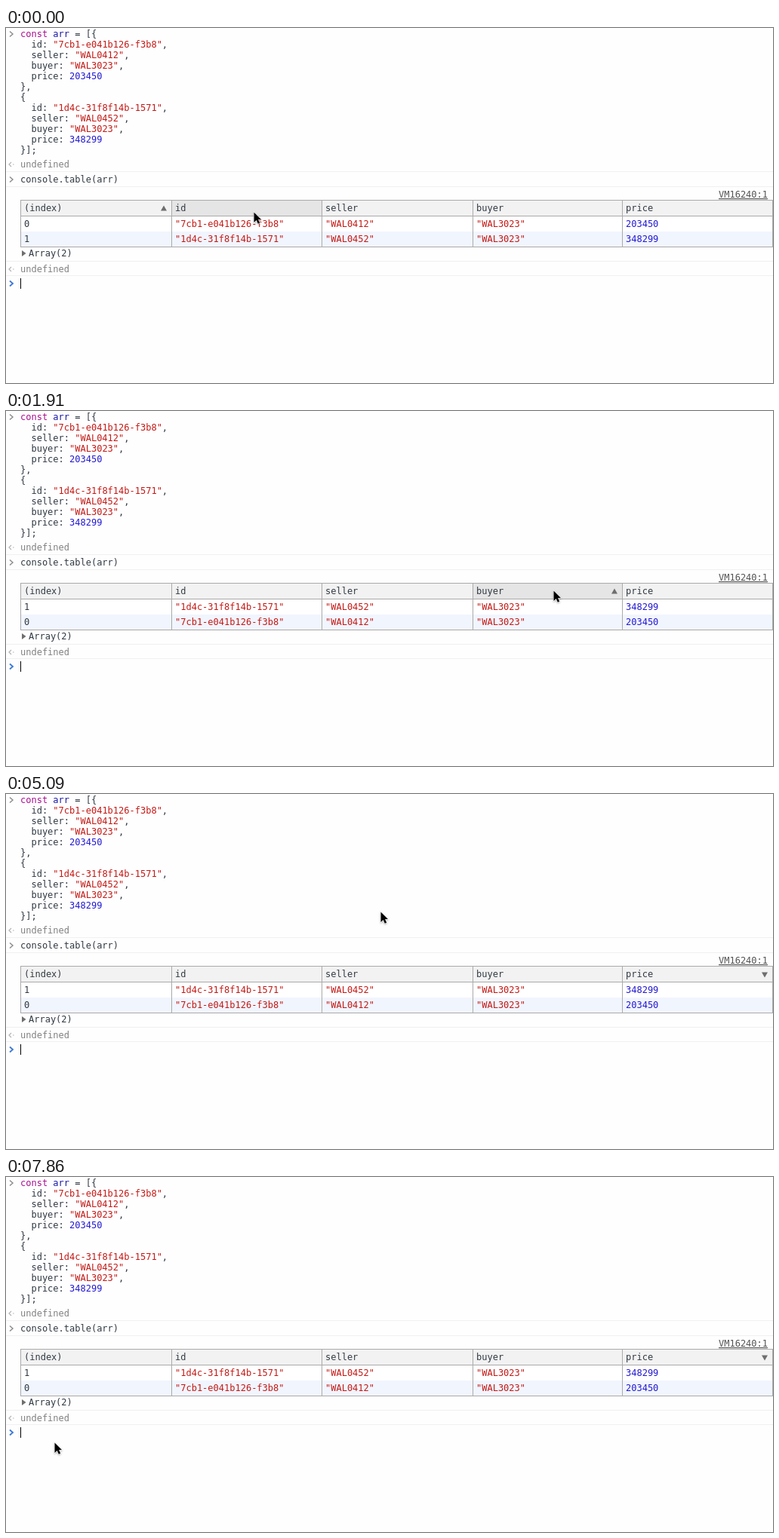
Animation of 1016x471 px, one loop 8 s. Source, as an HTML page:

```html
<!DOCTYPE html>
<html lang="en">
<head>
<meta charset="utf-8">
<title>console.table</title>
<style>
  html, body { margin: 0; width: 100%; height: 100%; overflow: hidden; background: #fefefe; }
  svg { display: block; }
  text { font: 12px "DejaVu Sans Mono", "Liberation Mono", monospace; fill: #303942; white-space: pre; }
  .keyword { fill: #aa0d91; }
  .def { fill: #1a1aa8; }
  .string { fill: #c41a16; }
  .number { fill: #241bd2; }
  .muted { fill: #808080; }
  .link { fill: #545454; text-decoration: underline; }
  .rule { fill: #f0f0f0; }
  .border { fill: #aaa; }
  .mark { fill: #6e6e6e; }
  .chevron { fill: none; stroke: #8a8a8a; stroke-width: 1.4; }
  .chevron.active { stroke: #3b78d8; stroke-width: 1.8; }
  .chevron.result { stroke: #b4b4b4; stroke-width: 1.2; }
  #pointer { filter: drop-shadow(0 1px 1px rgba(0, 0, 0, .3)); }
</style>
</head>
<body>
<svg width="1016" height="471" viewBox="0 0 1016 471">
  <g id="log"></g>
  <g id="table"></g>
  <path id="sort" class="mark"/>
  <rect id="caret" x="19" y="332" width="1" height="14" fill="#000"/>
  <path id="pointer" d="M.5 .5V14L3.7 11L5.8 15.8L8.2 14.8L6.1 10H10z"
        fill="#000" stroke="#fff" stroke-width="1.2" paint-order="stroke"/>
</svg>
<script>
const LOOP = 8000, BLINK = 498, HOLD = 125;
const HEAD = { top: 229, bottom: 249 };
const ROW = 20;
const edges = [19, 219, 418, 618, 816, 1015];
const titles = ["(index)", "id", "seller", "buyer", "price"];
const records = [
  ["7cb1-e041b126-f3b8", "WAL0412", "WAL3023", 203450],
  ["1d4c-31f8f14b-1571", "WAL0452", "WAL3023", 348299]
];
const cells = records.map((record, n) => [n, ...record]);

// Mouse releases; the pointer decides which column they sort
const clicks = [165, 320, 1200, 1440, 1910, 2890, 3870];

const home = { x: 328, y: 244 };
const moves = [
  { from: 340, to: 760, x: 549, y: 238 },
  { from: 1460, to: 1790, x: 725, y: 238 },
  { from: 2110, to: 2470, x: 899, y: 238 },
  { from: 4903, to: 5690, x: 104, y: 88, bend: 9 },
  { from: 5700, to: 6060, x: 106, y: 119 },
  { from: 6080, to: 6640, x: 73, y: 10 },
  { from: 7020, to: 7110, x: 73, y: 2 },
  { from: 7370, to: 7800, x: 64, y: 352, bend: -12 }
];

const el = id => document.getElementById(id);
const text = (x, y, body, cls = "") => `<text x="${x}" y="${y}" class="${cls}">${body}</text>`;
const rect = (x, y, w, h, attrs) => `<rect x="${x}" y="${y}" width="${w}" height="${h}" ${attrs}/>`;
const chevron = (y, cls = "") => `<path class="chevron ${cls}" d="M5 ${y - 3.5}l4 3.5l-4 3.5"/>`;
const result = y => `<path class="chevron result" d="M7 ${y - 3}l-3 3l3 3M9 ${y}h1.6"/>` +
  text(19, y + 4, "undefined", "muted");

function highlight(line) {
  return line.replace(/"[^"]*"|\b\d+\b|\bconst\b|\barr\b(?= =)/g, word => {
    const cls = word[0] === '"' ? "string" : word === "const" ? "keyword" : word === "arr" ? "def" : "number";
    return `<tspan class="${cls}">${word}</tspan>`;
  });
}

function buildLog() {
  const fields = ([id, seller, buyer, price]) =>
    [`  id: "${id}",`, `  seller: "${seller}",`, `  buyer: "${buyer}",`, `  price: ${price}`];
  const code = ["const arr = [{", ...fields(records[0]), "},", "{", ...fields(records[1]), "}];"];
  el("log").innerHTML =
    code.map((line, i) => text(19, 12 + 14 * i, highlight(line))).join("") +
    [190, 210, 309, 328].map(y => rect(0, y, 1016, 1, 'class="rule"')).join("") +
    chevron(8) + result(181) + chevron(201) + text(19, 205, "console.table(arr)") +
    text(944, 225, "VM16240:1", "link") +
    '<path class="mark" d="M21 295l5.5 4l-5.5 4z"/>' + text(30, 303, "Array(2)") +
    result(320) + chevron(339, "active");
}

function buildTable() {
  const cell = (value, i) => {
    const isString = typeof value === "string";
    const cls = isString ? "string" : i ? "number" : "";
    return text(edges[i] + 5, 264, isString ? `"${value}"` : value, cls);
  };
  const heads = titles.map((title, i) =>
    rect(edges[i], HEAD.top, edges[i + 1] - edges[i], HEAD.bottom - HEAD.top, 'class="head"') +
    text(edges[i] + 5, 243, title));
  const rows = cells.map(row => `<g class="row">${row.map(cell).join("")}</g>`);
  el("table").innerHTML =
    rect(20, 250, 995, ROW, 'fill="#fff"') + rect(20, 270, 995, ROW, 'fill="#f1f5fe"') +
    heads.join("") + rows.join("") +
    [228, 249, 290].map(y => rect(19, y, 997, 1, 'class="border"')).join("") +
    edges.map(x => rect(x, 228, 1, 63, 'class="border"')).join("");
}

// Each move starts fast and settles; bend bows it sideways.
function pointerAt(t) {
  let { x, y } = home;
  for (const { from, to, x: toX, y: toY, bend = 0 } of moves) {
    if (t < from) break;
    const u = Math.min(1, (t - from) / (to - from));
    const eased = 1 - (1 - u) ** 2.6;
    const dx = toX - x, dy = toY - y;
    const bow = bend * Math.sin(Math.PI * u) / Math.hypot(dx, dy);
    x += dx * eased - dy * bow;
    y += dy * eased + dx * bow;
  }
  return { x: Math.round(x), y: Math.round(y) };
}

const columnAt = ({ x, y }) => y >= HEAD.top && y < HEAD.bottom
  ? titles.findIndex((_, i) => x >= edges[i] && x < edges[i + 1]) : -1;

// Replays the clicks up to t, sorting the way the console does.
function sortAt(t) {
  let column = 0, sign = 1, order = [...cells];
  for (const click of clicks.filter(c => c <= t)) {
    const hit = columnAt(pointerAt(click));
    sign = hit === column ? -sign : 1;
    column = hit;
    order.sort((a, b) => sign * ((a[hit] > b[hit]) - (a[hit] < b[hit])));
  }
  return { column, sign, order };
}

buildLog();
buildTable();
const heads = [...document.querySelectorAll(".head")];
const rows = [...document.querySelectorAll(".row")];

function draw(t) {
  const pointer = pointerAt(t);
  el("pointer").setAttribute("transform", `translate(${pointer.x} ${pointer.y})`);

  const hover = columnAt(pointer);
  const pressed = clicks.some(c => t >= c - HOLD && t < c);
  heads.forEach((head, i) =>
    head.setAttribute("fill", i !== hover ? "#f2f2f2" : pressed ? "#c8c8c8" : "#e5e5e5"));

  const { column, sign, order } = sortAt(t);
  const mid = edges[column + 1] - 10;
  el("sort").setAttribute("d", `M${mid - 4} ${239.5 + sign * 3}h8l-4 ${-7 * sign}z`);
  rows.forEach((row, n) =>
    row.setAttribute("transform", `translate(0 ${ROW * order.indexOf(cells[n])})`));

  // Every click restarts the blinking.
  const lastClick = clicks.findLast(c => c <= t) ?? 0;
  const lit = Math.floor((t - lastClick) / BLINK) % 2 === 0;
  el("caret").setAttribute("visibility", lit ? "visible" : "hidden");
}

const start = performance.now();
function tick() {
  draw((performance.now() - start) % LOOP);
  requestAnimationFrame(tick);
}
tick();
</script>
</body>
</html>
```
